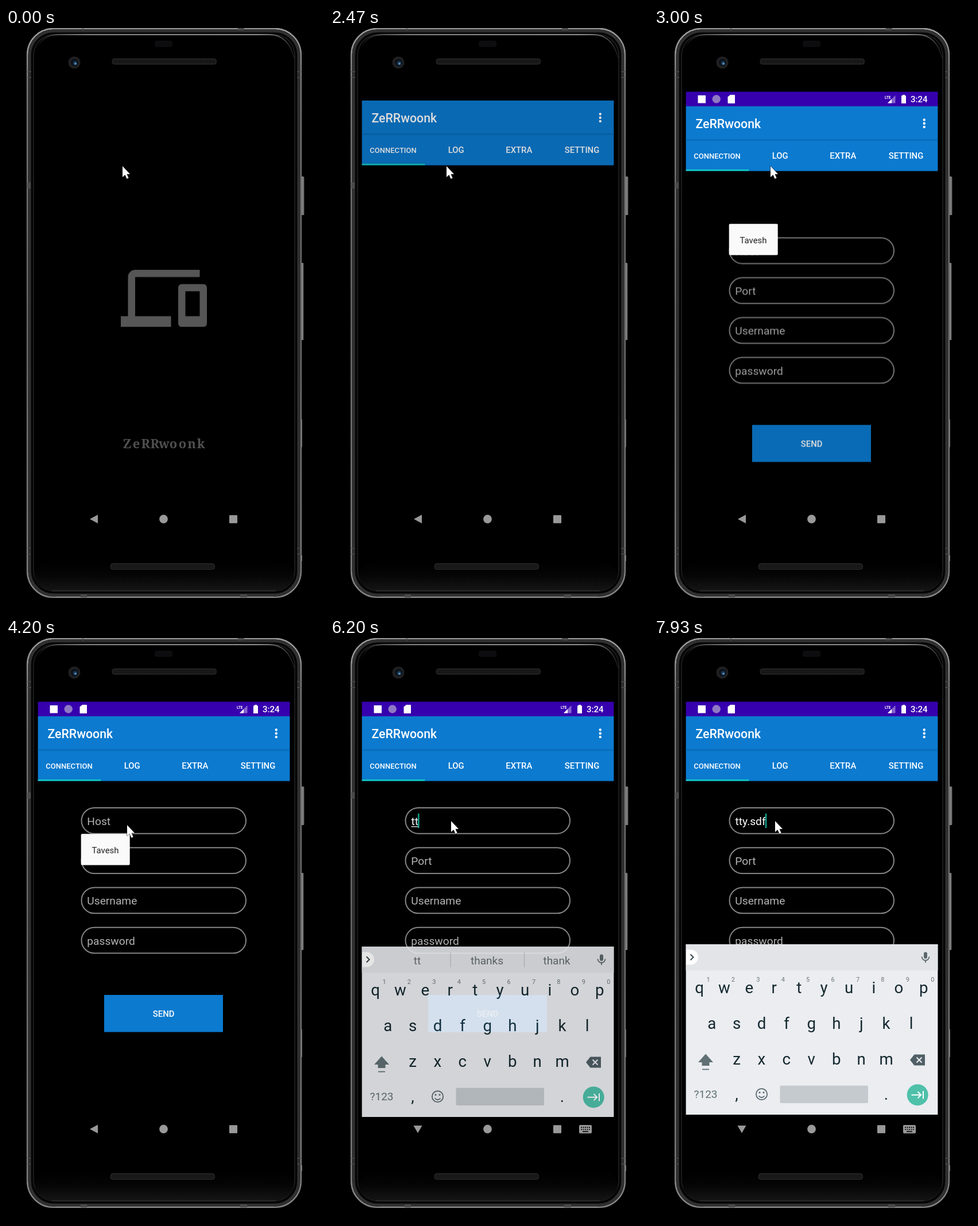
An HTML page for the animation above (8000 ms loop, 554 px wide and 1011 px high).

```html
<!DOCTYPE html>
<html lang="en">
<head>
<meta charset="utf-8">
<title>Phone app demo</title>
<style>
html, body { margin: 0; width: 100%; height: 100%; overflow: hidden; background: #000; }
svg { display: block; width: 100%; height: 100%; font-family: Roboto, sans-serif; }
.mid { text-anchor: middle; }
.med { font-weight: 500; }
.hint { font-size: 19.2px; fill: #b3b3b3; }
.field { fill: #000; stroke: #868686; stroke-width: 2; }

#splash, #bar, #status, #form, #popup, #hostHint, #back, #down, #keys, #words,
#line, #blink, .pen { animation: 8s step-end infinite; }
#splash { animation-name: splash; }
#bar { animation-name: bar; }
#status { animation-name: status; }
#form { animation-name: form; }
#popup { animation-name: popup; transform-origin: 173px 340px; }
#hostHint { animation-name: leave; }
#back { animation-name: back; }
#down { animation-name: down; }
#keys { animation-name: keys; }
#words { animation-name: words; }
#line { animation-name: line; }
#blink { animation-name: blink; }
.pen { animation-name: type; }
#mouse { animation: mouse 8s ease-in-out infinite; }

@keyframes splash { 0% { opacity: 1 } 30.85%, 100% { opacity: 0 } }
@keyframes bar {
  0% { opacity: 0; transform: translateY(-10px) }
  30.85% { opacity: .87; transform: translateY(-10px) }
  31.7%, 100% { opacity: 1; transform: none }
}
@keyframes status { 0% { opacity: 0 } 31.7%, 100% { opacity: 1 } }
@keyframes form {
  0% { opacity: 0; transform: translateY(145px) }
  36.65% { opacity: .73; transform: translateY(145px) }
  37.45% { opacity: .88; transform: translateY(69.5px) }
  38.3%, 100% { opacity: 1; transform: none }
}
@keyframes popup {
  0% { opacity: 0; transform: none }
  36.65% { opacity: 1; transform: none }
  75% { opacity: .55; transform: scale(.97) }
  75.8% { opacity: .09; transform: scale(.91) }
  76.6%, 100% { opacity: 0; transform: scale(.9) }
}
@keyframes leave { 0% { opacity: 1 } 75%, 100% { opacity: 0 } }
@keyframes back { 0% { opacity: 1 } 75.8%, 100% { opacity: 0 } }
@keyframes down { 0% { opacity: 0 } 75.8%, 100% { opacity: 1 } }
@keyframes keys {
  0% { opacity: 0; transform: translateY(22px) }
  76.6% { opacity: .5; transform: translateY(22px) }
  77.45% { opacity: .9; transform: translateY(4px) }
  78.3%, 100% { opacity: 1; transform: none }
}
@keyframes words { 0% { opacity: 1 } 85.8%, 100% { opacity: 0 } }
@keyframes type {
  0% { transform: none }
  75% { transform: translateX(6.3px) }
  75.8% { transform: translateX(12.7px) }
  85.8% { transform: translateX(21.6px) }
  88.3% { transform: translateX(26.6px) }
  91.6% { transform: translateX(36.5px) }
  95% { transform: translateX(47.2px) }
  97.5%, 100% { transform: translateX(53.4px) }
}
@keyframes line {
  0% { width: 0 }
  75% { width: 6.3px }
  75.8% { width: 12.7px }
  85.8% { width: 21.6px }
  88.3%, 100% { width: 0 }
}
@keyframes blink {
  0% { opacity: 0 }
  42.5% { opacity: 1 } 48.7% { opacity: 0 }
  55% { opacity: 1 } 61.2% { opacity: 0 }
  67.45% { opacity: 1 } 73.7% { opacity: 0 }
  75%, 100% { opacity: 1 }
}
@keyframes mouse {
  0%, 42% { transform: translate(203px, 240px) }
  48%, 53% { transform: translate(211px, 325px) }
  57%, 100% { transform: translate(211px, 318px) }
}
</style>
</head>
<body>
<svg viewBox="0 0 554 1011" preserveAspectRatio="none">
  <defs>
    <linearGradient id="rim" x2="0" y2="1">
      <stop offset="0" stop-color="#a0a0a0"/><stop offset=".1" stop-color="#7c7c7c"/>
      <stop offset=".5" stop-color="#6c6c6c"/><stop offset="1" stop-color="#858585"/>
    </linearGradient>
    <linearGradient id="shine">
      <stop offset="0" stop-color="#fff" stop-opacity="0"/><stop offset=".2" stop-color="#aaa"/>
      <stop offset=".85" stop-color="#bbb"/><stop offset="1" stop-color="#fff" stop-opacity=".1"/>
    </linearGradient>
    <linearGradient id="chin" x2="0" y2="1">
      <stop offset="0" stop-color="#000"/><stop offset=".5" stop-color="#050505"/><stop offset="1" stop-color="#141414"/>
    </linearGradient>
    <linearGradient id="key">
      <stop offset="0" stop-color="#444"/><stop offset=".6" stop-color="#8c8c8c"/><stop offset="1" stop-color="#555"/>
    </linearGradient>
    <pattern id="mesh" width="3" height="3" patternUnits="userSpaceOnUse">
      <rect width="3" height="3" fill="#101010"/><circle cx="1.5" cy="1.5" r=".9" fill="#2a2a2a"/>
    </pattern>
    <clipPath id="screen"><rect x="55" y="110" width="440" height="722"/></clipPath>
  </defs>
  <rect width="554" height="1011"/>

  <g id="phone">
    <g fill="url(#key)">
      <rect x="513" y="258" width="6.5" height="67" rx="1.5"/>
      <rect x="513" y="408" width="5.5" height="134" rx="1.5"/>
      <rect x="513" y="680" width="3" height="48"/>
      <rect x="513" y="916" width="3" height="10"/>
    </g>
    <rect x="37.2" y="1.2" width="476.6" height="987.6" rx="45" fill="#0c0c0c" stroke="url(#rim)" stroke-width="2.6"/>
    <rect x="41" y="5" width="469" height="980" rx="42" fill="none" stroke="#303030" stroke-width="5"/>
    <rect x="45.5" y="9.5" width="460" height="971" rx="38" fill="none" stroke="#050505" stroke-width="3"/>
    <rect x="48" y="11.5" width="455" height="966" rx="36" stroke="#1b1b1b" stroke-width="2"/>
    <rect x="50" y="925" width="451" height="51" rx="34" fill="url(#chin)"/>
    <path d="M80 977.5H470" stroke="#2c2c2c" stroke-width="2"/>
    <path d="M54 38Q62 11.5 92 11.5H458Q492 11.5 502 52" fill="none" stroke="url(#shine)" stroke-width="1.6"/>
    <path d="M76 1H476M86 988.5H466" stroke="#8c8c8c" stroke-width="1.5"/>
    <g fill="#4a4a4a">
      <path d="M37 75h7v1.5h-7zM37 85h7v1.5h-7zM507 75h7v1.5h-7zM507 85h7v1.5h-7z"/>
      <path d="M37 268h6v11h-6zM37 903h6v1.5h-6zM507 903h7v1.5h-7zM37 913h6v1.5h-6zM507 913h7v1.5h-7z"/>
      <path d="M133 0h1.5v5h-1.5zM404 0h11v4h-11zM130 984h11v5h-11zM408 984h12v5h-12z"/>
    </g>
    <rect x="259" y="22" width="31" height="11" rx="4" fill="#0d0c0f"/>
    <g fill="url(#mesh)" stroke="#2e2e2e">
      <rect x="185" y="53.5" width="181.5" height="9.5" rx="4"/>
      <rect x="182" y="930.5" width="181.5" height="10" rx="4"/>
    </g>
    <circle cx="119" cy="60" r="10.5" fill="#202022"/>
    <circle cx="119.5" cy="60" r="6.5" fill="#0c1219"/>
    <circle cx="120.5" cy="61" r="3.6" fill="#1c3c5a"/>
    <circle cx="121" cy="62" r="1.5" fill="#70a7cf"/>
  </g>

  <g id="nav" fill="#999">
    <path id="back" d="M146 853 160 845.5V860.5Z"/>
    <circle cx="274.5" cy="853" r="7.4"/>
    <rect x="389" y="846.3" width="14" height="14" rx="1"/>
    <g id="down">
      <path d="M145.5 847H160.5L153 860Z"/>
      <rect x="434" y="846" width="22" height="14.5" rx="2"/>
      <path d="M437 850H453M437 853.6H453" stroke="#111" stroke-width="1.8" stroke-dasharray="2 1.5"/>
      <path d="M440 857.3H450" stroke="#111" stroke-width="1.8"/>
    </g>
  </g>

  <g id="splash">
    <path fill="#565656" transform="translate(200 395.3) scale(6.25 6.2)" d="M4 6h18V4H4c-1.1 0-2 .9-2 2v11H0v3h14v-3H4V6zm19 2h-6c-.55 0-1 .45-1 1v10c0 .55.45 1 1 1h6c.55 0 1-.45 1-1V9c0-.55-.45-1-1-1zm-1 9h-4v-7h4v7z"/>
    <text id="brand" class="mid" y="730" font-family="'Noto Serif', serif" font-size="22" font-weight="600" fill="#505050"></text>
  </g>

  <g clip-path="url(#screen)">
    <g id="form">
      <g id="fields"></g>
      <rect x="171" y="620" width="207" height="64.5" fill="#0b7acf"/>
      <text class="mid med" x="274.7" y="658" font-size="14.9" fill="#fff">SEND</text>
      <g id="typing">
        <text x="141.5" y="325" font-size="19.2" fill="#fff">tty.sdf</text>
        <rect class="pen" x="141.3" y="304" width="62" height="27"/>
        <rect id="line" x="141.5" y="327" height="1.4" fill="#ddd"/>
        <g class="pen"><rect id="blink" x="140.5" y="305" width="2.2" height="25" fill="#18bfa8"/></g>
      </g>
      <text id="hostHint" class="hint"></text>
    </g>

    <g id="bar">
      <rect x="55.6" y="136" width="438.8" height="112.5" fill="#0b7acf"/>
      <rect x="55.6" y="193" width="438.8" height="3" fill="#0967b0" opacity=".6"/>
      <rect x="55.6" y="245.8" width="109.7" height="2.4" fill="#14cfc0"/>
      <g fill="#fff" class="med">
        <text x="72.5" y="173.5" font-size="21.3">ZeRRwoonk</text>
        <circle cx="470.8" cy="159.5" r="2.2"/><circle cx="470.8" cy="165.7" r="2.2"/><circle cx="470.8" cy="171.9" r="2.2"/>
        <g class="mid" font-size="14.9">
          <text x="110" y="226.5" font-size="13">CONNECTION</text>
          <text x="219.7" y="227.2">LOG</text>
          <text x="329.3" y="227.2">EXTRA</text>
          <text x="439" y="227.2">SETTING</text>
        </g>
      </g>
    </g>

    <g id="status">
      <rect x="55.6" y="110.7" width="438.8" height="25.3" fill="#3600ae"/>
      <circle cx="108.7" cy="123.5" r="7.2" fill="#8f79c4"/>
      <g fill="#fff">
        <rect x="76.5" y="117" width="13.5" height="13.5"/>
        <path d="M133 116h7q1 0 1 1v13q0 1-1 1h-10.5q-1 0-1-1V119.5z"/>
        <text x="402" y="122.5" font-size="6.4" font-weight="700">LTE</text>
        <path d="M420.5 117V130.5H407Z" opacity=".4"/>
        <path d="M414 123.5V130.5H407Z"/>
        <path d="M433 116h4v1.5h2v13.5h-8v-13.5h2z"/>
        <text class="med" x="447" y="129" font-size="15">3:24</text>
      </g>
    </g>

    <g id="popup">
      <rect x="130.7" y="340.2" width="85" height="54.3" rx="2" fill="#fafafa"/>
      <text class="mid" x="173" y="373.5" font-size="14.9" fill="#222">Tavesh</text>
    </g>

    <g id="keys">
      <rect x="55.6" y="532" width="438.8" height="296" fill="#ebedf1"/>
      <rect x="55.6" y="532" width="438.8" height="45.5" fill="#e2e4e8"/>
      <path d="M56 541.5H64A13 13 0 0 1 64 567.5H56Z" fill="#fff"/>
      <path d="M63.5 549.5 68.5 554.5 63.5 559.5" fill="none" stroke="#37474f" stroke-width="2"/>
      <rect x="470" y="545.5" width="6" height="11.5" rx="3" fill="#5c686d"/>
      <path d="M466.5 553.5a6.5 6.5 0 0 0 13 0M473 560.5V564" fill="none" stroke="#5c686d" stroke-width="1.8"/>
      <g id="words" class="mid" font-size="19" fill="#626b70">
        <path d="M210 542V568M338.5 542V568" stroke="#b9bdc1" stroke-width="1.2"/>
        <text x="152" y="562.5">tt</text><text x="273.5" y="562.5">thanks</text><text x="395" y="562.5">thank</text>
      </g>
      <g id="letters" class="mid" font-size="27.7" fill="#14282f"></g>
      <g fill="#607074">
        <path d="M90 722.5 103 737H96.5V743H83.5V737H77Z"/>
        <rect x="84" y="748.5" width="12" height="1.8"/>
        <path d="M446 733 453.5 723.5H472V742.5H453.5Z" fill="#505f66"/>
        <text class="mid" x="90" y="799" font-size="19">?123</text>
      </g>
      <path d="M457.5 728.5 466.5 737.5M466.5 728.5 457.5 737.5" stroke="#ebedf1" stroke-width="2"/>
      <g fill="none" stroke="#5a686e" stroke-width="1.8">
        <circle cx="187.5" cy="792.5" r="9.6"/>
        <path d="M182.5 795.5Q187.5 801 192.5 795.5"/>
      </g>
      <circle cx="184" cy="789.5" r="1.5" fill="#5a686e"/><circle cx="191" cy="789.5" r="1.5" fill="#5a686e"/>
      <rect x="219.5" y="777.5" width="153.5" height="30.5" rx="2" fill="#c5cace"/>
      <circle cx="459.2" cy="793.7" r="18.5" fill="#4fc0aa"/>
      <path d="M448.5 793.7H465M459.5 788 465.2 793.7 459.5 799.4M469 787V800.5" fill="none" stroke="#fff" stroke-width="2"/>
    </g>
  </g>

  <path id="mouse" d="M0 0V19L4.4 15 7.5 22 10.6 20.6 7.5 13.8H13Z" fill="#fff" stroke="#000" paint-order="stroke"/>
</svg>
<script>
const $ = id => document.getElementById(id);

function add(parent, tag, attrs, text = '') {
  const el = document.createElementNS('http://www.w3.org/2000/svg', tag);
  for (const name in attrs) el.setAttribute(name, attrs[name]);
  el.textContent = text;
  parent.append(el);
  return el;
}

// Fixed-pitch lettering for the splash name
[...'ZeRRwoonk'].forEach((c, i) => add($('brand'), 'tspan', { x: 211 + i * 16.1 }, c));

['Host', 'Port', 'Username', 'password'].forEach((label, i) => {
  const y = 294.9 + i * 69.3;
  add($('fields'), 'rect', { class: 'field', x: 131.5, y, width: 286.5, height: 44.8, rx: 22.4 });
  const hint = i ? add($('fields'), 'text', { class: 'hint' }, label) : $('hostHint');
  hint.textContent = label;
  hint.setAttribute('x', 141.3);
  hint.setAttribute('y', y + 29.8);
});

const pitch = 43.42;
[['qwertyuiop', 79, 617], ['asdfghjkl', 100.7, 679], ['zxcvbnm', 144, 741]].forEach(([row, x0, y], r) => {
  [...row].forEach((c, i) => {
    const x = x0 + i * pitch;
    add($('letters'), 'text', { x, y }, c);
    if (!r) add($('letters'), 'text', { x: x + 15.5, y: 596.5, 'font-size': 11, fill: '#6b757a' }, (i + 1) % 10);
  });
});
add($('letters'), 'text', { x: 144, y: 802 }, ',');
add($('letters'), 'text', { x: 404.5, y: 802 }, '.');
</script>
</body>
</html>
```
